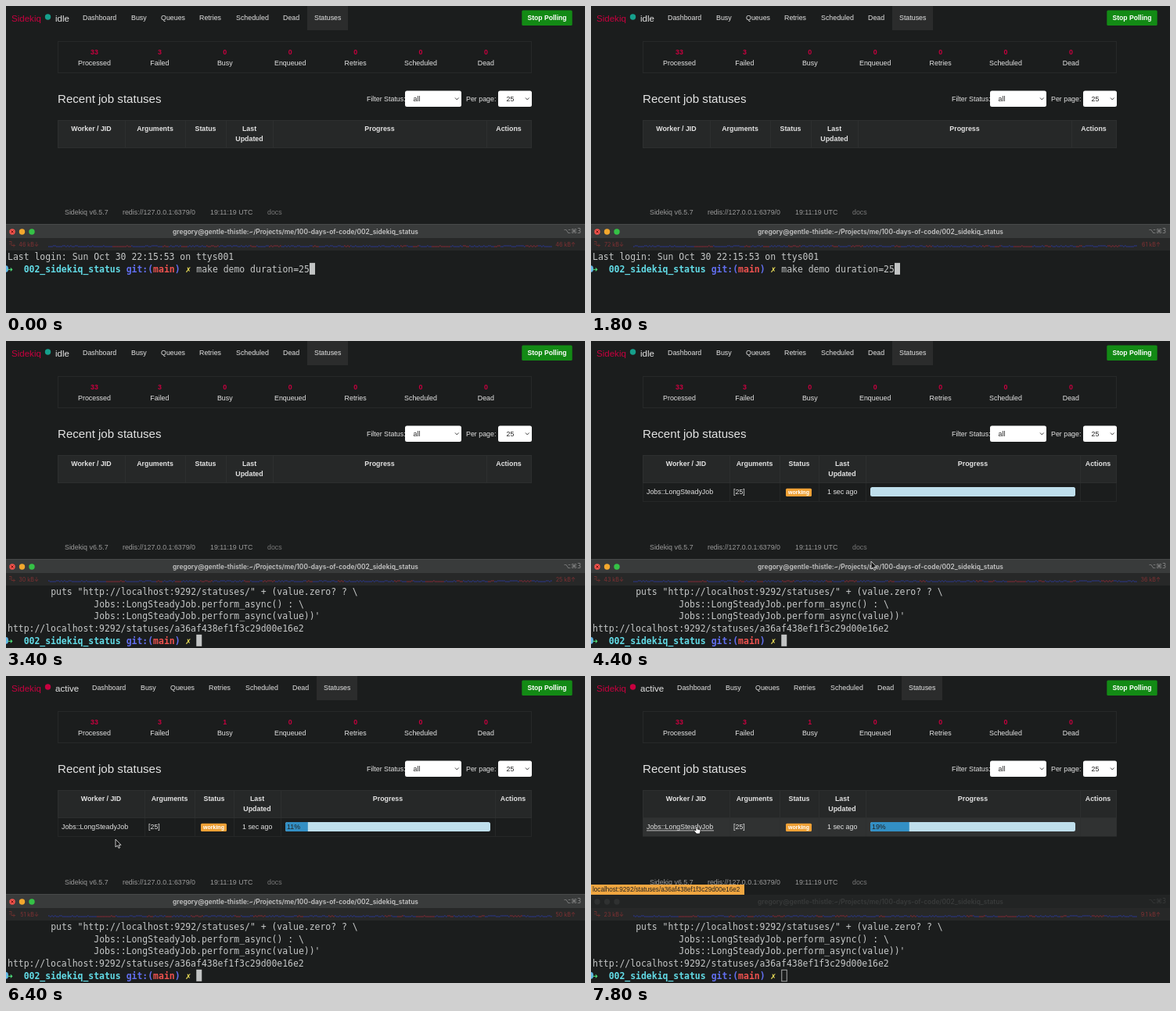
An HTML page for the animation above (8000 ms loop, 740 px wide and 393 px high).

```html
<!DOCTYPE html>
<html lang="en">
<head>
<meta charset="utf-8">
<title>Job status demo</title>
<style>
html, body { margin: 0; width: 100%; height: 100%; overflow: hidden; background: #1b1d1d; }
svg { display: block; width: 740px; height: 393px; }
text { font-family: "Liberation Sans", Arial, sans-serif; font-size: 8.85px; fill: #e4e4e4; white-space: pre; }
.b { font-weight: 700; }
.mid { text-anchor: middle; }
.end { text-anchor: end; }
.brand { font-size: 11.55px; }
.red { fill: #c8003f; }
.dark { fill: #222; }
.foot { fill: #9b9b9b; }
.title { font: 600 8.4px Inter, sans-serif; }
.net { font: 7.2px Inter, sans-serif; fill: #803133; }
.term { font: 11.45px "DejaVu Sans Mono", monospace; fill: #c6c8c8; }
.term.b { font-weight: 700; }
.line { fill: none; stroke: #2d2f2f; }
#pointer { animation: move 8s linear infinite; }
@keyframes move {
  0%, 49.9% { transform: translate(430px, 345px); opacity: 0; }
  50% { transform: translate(420px, 335px); opacity: 1; }
  55% { transform: translate(358px, 282px); animation-timing-function: ease-in-out; }
  67.5% { transform: translate(181px, 210px); }
  80% { transform: translate(140px, 209px); }
  87.4%, 100% { transform: translate(134px, 192px); opacity: 1; }
}
</style>
</head>
<body>
<svg id="stage" viewBox="0 0 740 393" xmlns="http://www.w3.org/2000/svg"></svg>
<script>
const LOOP = 8000;
const moments = { enter: 2190, printed: 2990, listed: 3790, active: 5790, hover: 6990, later: 7790 };

// Each moment gets a pair of classes: till-<name> and from-<name>.
const sheet = document.createElement('style');
sheet.textContent = Object.entries(moments).map(([name, ms]) => {
  const at = ms / LOOP * 100;
  const rule = (kind, before, after) =>
    `@keyframes ${kind}-${name} { 0% { opacity: ${before} } ${at}%, 100% { opacity: ${after} } }
     .${kind}-${name} { animation: ${kind}-${name} ${LOOP}ms step-end infinite; }`;
  return rule('till', 1, 0) + rule('from', 0, 1);
}).join('\n');
document.head.append(sheet);

const text = (x, y, str, cls = '', attrs = '') => `<text x="${x}" y="${y}" class="${cls}" ${attrs}>${str}</text>`;
const rect = (x, y, w, h, fill, attrs = '') => `<rect x="${x}" y="${y}" width="${w}" height="${h}" fill="${fill}" ${attrs}/>`;
const dot = (x, y, r, fill) => `<circle cx="${x}" cy="${y}" r="${r}" fill="${fill}"/>`;
const group = (cls, ...parts) => `<g class="${cls}">${parts.join('')}</g>`;

function nav(state, color, shift) {
  const items = { Dashboard: 98, Busy: 160, Queues: 198, Retries: 247, Scheduled: 294, Dead: 354, Statuses: 394 };
  return dot(53.5, 14, 3.7, color) + text(63, 19.5, state, 'brand') +
    rect(385 + shift, 0, 52, 31, '#2b2c2c') +
    Object.entries(items).map(([label, x]) => text(x + shift, 18.2, label)).join('');
}

function stats() {
  const counts = { Processed: 33, Failed: 3, Busy: 0, Enqueued: 0, Retries: 0, Scheduled: 0, Dead: 0 };
  return rect(66.5, 45.5, 605, 40, 'none', 'stroke="#272929"') +
    Object.entries(counts).map(([label, n], i) => {
      const x = 113 + i * 83.4;
      const count = label === 'Busy'
        ? group('till-active', text(x, 62, 0, 'b red mid')) + group('from-active', text(x, 62, 1, 'b red mid'))
        : text(x, 62, n, 'b red mid');
      return count + text(x, 75.8, label, 'mid');
    }).join('');
}

function select(x, w, value) {
  return rect(x, 108.4, w, 20.6, '#fff', 'rx="2.5"') + text(x + 10.5, 122, value, 'dark') +
    `<path d="M${x + w - 8} 117.5l2.3 2.5 2.3-2.5" fill="none" stroke="#444"/>`;
}

function tableHead(edges) {
  const labels = ['Worker / JID', 'Arguments', 'Status', 'Last|Updated', 'Progress', 'Actions'];
  return rect(66, 146, 606, 36, '#262828') +
    `<path class="line" d="M66 146.5H672M66 181.5H672${edges.map(x => `M${x + .5} 146V182`).join('')}"/>` +
    labels.map((label, i) => label.split('|').map((part, line) =>
      text((edges[i] + edges[i + 1]) / 2, 160.2 + line * 12.6, part, 'b mid')).join('')).join('');
}

function progress(percent) {
  const w = 262 * percent / 100;
  return `<path d="M${357 + w} 187H359.5a2.5 2.5 0 0 0-2.5 2.5v7a2.5 2.5 0 0 0 2.5 2.5H${357 + w}z" fill="#338fc4"/>` +
    text(359, 196.3, percent + '%', 'dark');
}

function jobRow() {
  return group('from-hover', rect(66, 182, 606, 23, '#303232')) +
    '<path class="line" opacity=".6" d="M66 205.5H672M66.5 182V205M177.5 182V205M241.5 182V205M291.5 182V205M351.5 182V205M625.5 182V205M671.5 182V205"/>' +
    text(71, 196.3, 'Jobs::LongSteadyJob') +
    group('from-hover', rect(71, 197.5, 86, .8, '#e4e4e4')) +
    text(182, 196.3, '[25]') +
    rect(249, 188.7, 33, 10.3, '#efa136', 'rx="1.5"') +
    text(265.5, 196.4, 'working', 'b mid', 'style="font-size:7px;fill:#fff"') +
    text(302, 196.3, '1 sec ago') +
    rect(357, 187, 262, 12, '#bfdfec', 'rx="2.5"') +
    group('from-active', group('till-later', progress(11)), group('from-later', progress(19)));
}

function page() {
  return rect(0, 0, 740, 280, '#1b1d1d') +
    text(7, 19.5, 'Sidekiq', 'brand red') +
    group('till-active', nav('idle', '#16a08c', 0)) +
    group('from-active', nav('active', '#c8003f', 12)) +
    rect(659.3, 5.4, 64.4, 19.6, '#138a15', 'rx="1.5"') +
    text(691.5, 18.4, 'Stop Polling', 'b mid', 'style="font-size:8.6px;fill:#fff"') +
    stats() +
    text(66, 124, 'Recent job statuses', '', 'style="font-size:15.1px"') +
    text(461, 122, 'Filter Status:') + select(510, 72, 'all') +
    text(588, 122, 'Per page:') + select(629, 43, '25') +
    group('till-listed', tableHead([66, 152, 229, 281, 341, 614, 671])) +
    group('from-listed', tableHead([66, 177, 241, 291, 351, 625, 671]), jobRow()) +
    text(75, 267.3, 'Sidekiq v6.5.7', 'foot') +
    text(149, 267.3, 'redis://127.0.0.1:6379/0', 'foot') +
    text(261, 267.3, '19:11:19 UTC', 'foot') +
    text(334, 267.3, 'docs', '', 'style="fill:#777"');
}

const col = n => 2 + n * 6.893;
const row = n => 325 + n * 15.65;
const type = (c, r, str, color = '', cls = '') =>
  text(col(c), row(r), str, 'term ' + cls, color && `style="fill:${color}"`);
const block = (c, r) => rect(col(c), row(r) - 11.8, 7, 15, '#c2c4c4');
const hash = 'a36af438ef1f3c29d00e16e2';

function prompt(r) {
  const y = row(r);
  return `<path d="M0 ${y - 8.5}q3 0 3 4.3t-3 4.3z" fill="#62b8e8"/>` +
    type(0, r, '➜', '#4fe07a', 'b') + type(3, r, '002_sidekiq_status', '#62dbe6', 'b') +
    type(22, r, 'git:(', '#626ff0', 'b') + type(27, r, 'main', '#f0524f', 'b') +
    type(31, r, ')', '#626ff0', 'b') + type(33, r, '✗', '#f0e35a', 'b');
}

const recipe = r =>
  type(8, r, 'puts "http://localhost:9292/statuses/" + (value.zero? ? \\') +
  type(16, r + 1, 'Jobs::LongSteadyJob.perform_async() : \\') +
  type(16, r + 2, "Jobs::LongSteadyJob.perform_async(value))'");

function titleBar(focused) {
  const lights = focused ? ['#f2544d', '#f2a72e', '#35c146'] : ['#2f3131', '#2f3131', '#2f3131'];
  const ink = focused ? '#c6c6c6' : '#393b3b';
  return rect(0, 280, 740, 17, focused ? '#393b3b' : '#222424') +
    (focused ? rect(0, 279, 740, 1, '#484a4a') : '') +
    lights.map((c, i) => dot(8 + i * 12.5, 289, 3.7, c)).join('') +
    (focused ? '<path d="M6.4 287.4l3.2 3.2m0-3.2l-3.2 3.2" stroke="#7c1512"/>' : '') +
    text(370, 291.6, 'gregory@gentle-thistle:~/Projects/me/100-days-of-code/002_sidekiq_status', 'title mid', `style="fill:${ink}"`) +
    text(735, 291.4, '⌥⌘3', 'end', `style="font:8px 'DejaVu Sans',sans-serif;fill:${focused ? '#8c8c8c' : ink}"`);
}

function terminal() {
  return rect(0, 280, 740, 113, '#1b1d1d') +
    group('till-hover', titleBar(true)) + group('from-hover', titleBar(false)) +
    rect(0, 297, 740, 16, '#272828') +
    '<path d="M4 301.5h3v5h5m-2-2v4m-5-5v2" fill="none" stroke="#75302f" stroke-width=".8"/>' +
    '<text id="down" x="42" y="307.7" class="net end"></text><text id="up" x="728" y="307.7" class="net end"></text>' +
    '<path id="blue" fill="none" stroke="#2b3aa4"/><path id="crimson" fill="none" stroke="#98293a"/>' +
    group('till-enter', type(0, 0, 'Last login: Sun Oct 30 22:15:53 on ttys001'),
      prompt(1), type(35, 1, 'make demo duration=25'), block(56, 1)) +
    group('from-enter', group('till-printed', recipe(1), block(0, 4))) +
    group('from-printed', recipe(0), type(0, 3, 'http://localhost:9292/statuses/' + hash), prompt(4),
      group('till-hover', block(35, 4)),
      group('from-hover', rect(col(35) + .5, row(4) - 11.3, 6.5, 14.5, 'none', 'stroke="#a8aaaa"')));
}

function overlay() {
  return group('from-hover',
      rect(0, 267, 196, 13, '#f0a640'),
      text(2, 276.4, 'localhost:9292/statuses/' + hash, 'dark', 'style="font-size:8.15px"')) +
    `<g id="pointer">
      <path class="till-hover" d="M0 0V10L2.4 7.9 4 11.4 5.6 10.7 4.1 7.3H7Z" fill="#111" stroke="#eee" stroke-width=".8"/>
      <path class="from-hover" d="M0 .8Q1 -.6 2 .8V4L5 4.6Q6.2 5 6 6.5L5 10H.8L-2.3 6.2Q-2.6 4.8-1.2 5L0 6Z" fill="#fff" stroke="#111" stroke-width=".8"/>
    </g>`;
}

const stage = document.getElementById('stage');
stage.innerHTML = page() + terminal() + overlay();

const [down, up, blue, crimson] = ['down', 'up', 'blue', 'crimson'].map(id => document.getElementById(id));
const rates = [
  [0, 46, 46], [990, 72, 61], [2590, 30, 25], [3790, 43, 36],
  [4790, 48, 44], [5790, 51, 50], [6990, 23, 9.1]
];
const noise = n => { const v = Math.sin(n * 12.9898) * 43758.5453; return v - Math.floor(v); };

function drawTraffic(step) {
  const [, received, sent] = rates[step];
  down.textContent = received + ' kB↓';
  up.textContent = sent + ' kB↑';
  let cool = '', warm = '';
  for (let x = 54; x < 697; x += 2) {
    const n = x / 2 + step * 2;
    const dash = `M${x} ${308 - Math.round(noise(n) * .8)}h1.6`;
    if (noise(Math.floor(n / 4) + 500) < .3) warm += dash; else cool += dash;
  }
  blue.setAttribute('d', cool);
  crimson.setAttribute('d', warm);
}

let shown = -1;
function tick() {
  const t = performance.now() % LOOP;
  const step = rates.filter(([start]) => start <= t).length - 1;
  if (step !== shown) drawTraffic(shown = step);
  requestAnimationFrame(tick);
}
tick();
</script>
</body>
</html>
```
